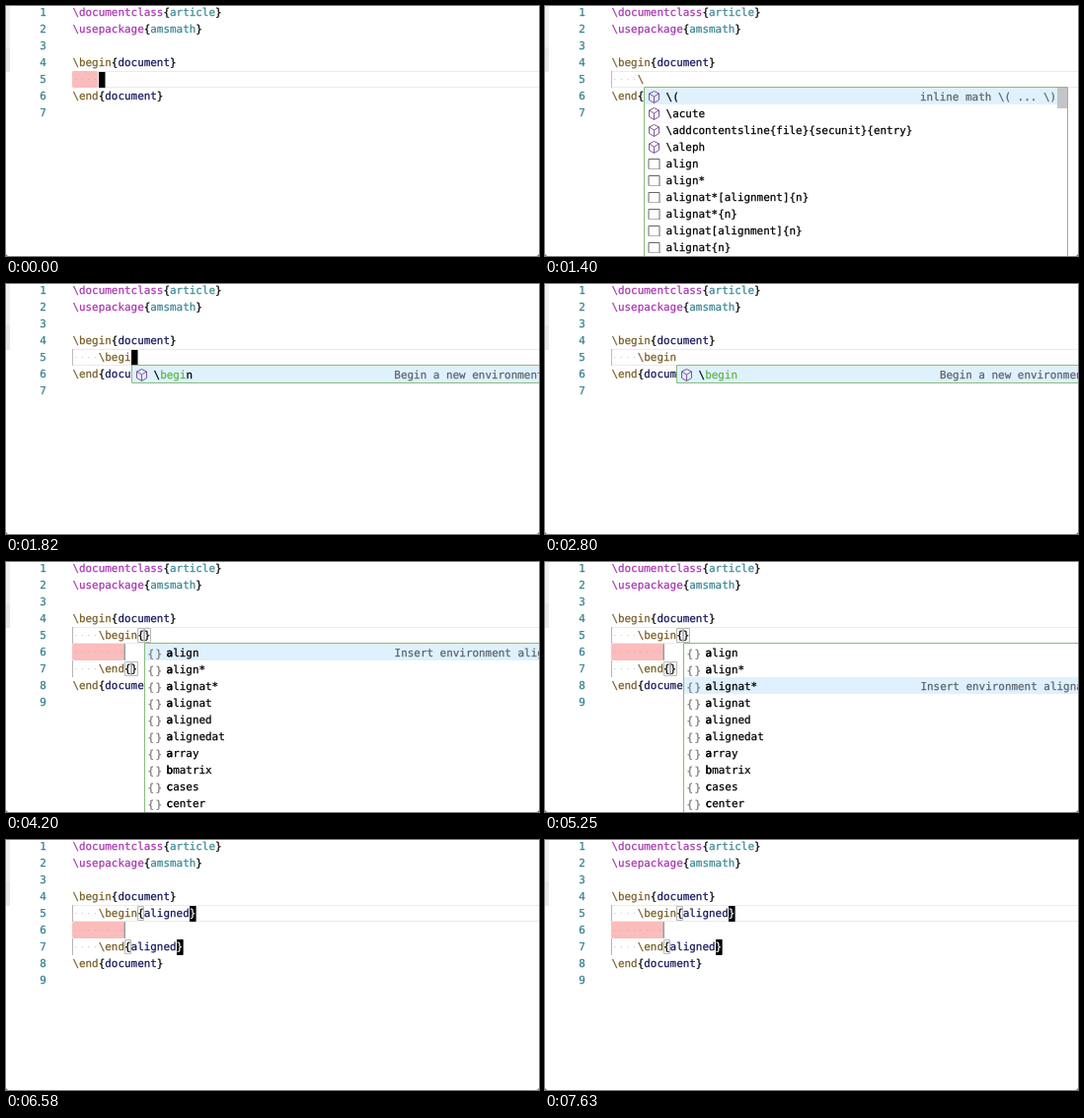
An HTML page with a canvas that plays this animation: 540x254 px, repeating every 7910 ms.

```html
<!DOCTYPE html>
<html lang="en">
<head>
<meta charset="utf-8">
<title>Editor completion</title>
<style>
html, body { margin: 0; height: 100%; overflow: hidden; background: #777; }
canvas { display: block; background: #fff; border-radius: 0 0 4px 4px; }
</style>
</head>
<body>
<canvas id="stage" width="540" height="254"></canvas>
<script>
const ctx = document.getElementById('stage').getContext('2d');
const LOOP = 7910, CHAR = 6.573, EDGE = 67, LEFT = 67.4, ROW = 17, POPUP_TOP = 83;
const colX = col => LEFT + col * CHAR;
const rowY = line => line * ROW - 19;

// [start, typed text]
const typing = [[0, ''], [490, '\\'], [1470, '\\b'], [1680, '\\be'], [1750, '\\beg'], [1820, '\\begi'], [2100, '\\begin']];
const INSERT = 3500, ACCEPT = 6300;
// [start, selected row]
const selection = [[0, 0], [4970, 1], [5250, 2], [5390, 3], [5530, 4]];
// [start, cursor opacity, fade duration]
const blink = [[0, 1, 0], [70, 0, 210], [490, 1, 0], [910, 0, 210], [1470, 1, 0], [2660, 0, 210], [3150, 1, 210],
  [3500, 1, 0], [3850, 0, 210], [4410, 1, 140], [4900, 0, 210], [5390, 1, 210], [5950, 0, 210],
  [6300, 1, 0], [6860, 0, 210], [7350, 1, 210]];

const environments = ['align', 'align*', 'alignat*', 'alignat', 'aligned', 'alignedat', 'array', 'bmatrix', 'cases', 'center'];
const lists = {
  '\\': ['\\(', '\\acute', '\\addcontentsline{file}{secunit}{entry}', '\\aleph', 'align', 'align*',
    'alignat*[alignment]{n}', 'alignat*{n}', 'alignat[alignment]{n}', 'alignat{n}'],
  '\\b': ['\\backslash', '\\bar', '\\begin', '\\beta', '\\bf', '\\bibitem', '\\big', '\\bigcap', '\\bigcup', '\\binom'],
  '\\be': ['\\begin', '\\begingroup', '\\belowcaptionskip', '\\beta', '\\beth', '\\because', '\\between', '\\bezier']
};

const current = (steps, t) => steps.filter(s => s[0] <= t).pop();

function cursorAlpha(t) {
  const [start, goal, fade] = current(blink, t);
  if (!fade) return goal;
  const k = Math.min(1, (t - start + 70) / fade);
  return goal ? k : 1 - k;
}

function rect(x, y, w, h, color) {
  ctx.fillStyle = color;
  ctx.fillRect(x, y, w, h);
}

// A hairline outline gives the slightly heavy look of smoothed screen type.
function text(str, x, baseline, color) {
  ctx.fillStyle = ctx.strokeStyle = color;
  ctx.lineWidth = .25;
  [...str].forEach((c, i) => {
    ctx.fillText(c, x + i * CHAR, baseline);
    ctx.strokeText(c, x + i * CHAR, baseline);
  });
  ctx.lineWidth = 1;
}

function code(line, str) {
  let col = 0, argColor;
  for (const part of str.match(/ +|\\\w*|[{}]|[^ {}\\]+/g) || []) {
    let color = argColor;
    if (part[0] === '\\') {
      const preamble = /class|package/.test(part);
      color = preamble ? '#a835b2' : '#795e26';
      argColor = preamble ? '#3b8895' : '#14185c';
    } else if (/[{}]/.test(part)) color = '#000';
    if (part[0] !== ' ') text(part, colX(col), rowY(line) + 12, color);
    col += part.length;
  }
}

function dots(line, count, color) {
  for (let i = 0; i < count; i++) rect(colX(i) + 2.8, rowY(line) + 8, 1.2, 1.2, color);
}

function warn(line, count) {
  ctx.fillStyle = '#fbbcbc';
  ctx.beginPath();
  ctx.roundRect(EDGE, rowY(line), count * CHAR, ROW, 2);
  ctx.fill();
  dots(line, count, '#eda6a6');
}

function bracket(line, col) {
  ctx.strokeStyle = '#b9b9b9';
  ctx.strokeRect(Math.round(colX(col)) + .5, rowY(line) + 1.5, 6, 14);
}

function cursor(line, col, under, alpha) {
  ctx.globalAlpha = alpha;
  rect(Math.round(colX(col)), rowY(line) + 1, 6.5, 16, '#000');
  text(under, colX(col), rowY(line) + 12, '#fff');
  ctx.globalAlpha = 1;
}

function path(points, color) {
  ctx.strokeStyle = color;
  ctx.beginPath();
  points.forEach(([x, y], i) => i ? ctx.lineTo(x, y) : ctx.moveTo(x, y));
  ctx.stroke();
}

function icon(label, x, y, braces) {
  if (braces) {
    text('{', x - 7, y + 4, '#777');
    text('}', x + 1, y + 4, '#777');
  } else if (label[0] === '\\') {
    const p = [[0, -6], [5, -3.5], [5, 3], [0, 6], [-5, 3], [-5, -3.5]].map(([a, b]) => [x + a, y + b]);
    path([...p, p[0]], '#80549c');
    path([p[5], [x, y - .5], p[1]], '#80549c');
    path([[x, y - .5], p[3]], '#80549c');
  } else {
    path([[x - 5.5, y + 5], [x - 5.5, y - 5], [x + 5.5, y - 5], [x + 5.5, y + 5]], '#666');
    ctx.setLineDash([1, 1]);
    path([[x - 5, y + 5], [x + 6, y + 5]], '#666');
    ctx.setLineDash([]);
  }
}

function popup(col, items, selected, detail, detailX, prefix, braces) {
  const x = Math.round(colX(col)), height = items.length > 9 ? 206 : items.length * ROW;
  rect(x, POPUP_TOP, 430, height, '#fff');
  rect(x + 1, POPUP_TOP + selected * ROW, 428, ROW, '#dff1fd');
  items.forEach((label, i) => {
    const y = POPUP_TOP + i * ROW, baseline = y + 13, textX = x + 22.6;
    icon(label, x + 10.5, y + 9.5, braces);
    const matched = label.startsWith(prefix) ? prefix.length : 1;
    text(label[0], textX, baseline, '#000');
    text(label.slice(1, matched), textX + CHAR, baseline, '#5fb548');
    text(label.slice(matched), textX + matched * CHAR, baseline, '#000');
  });
  text(detail, detailX, POPUP_TOP + 13 + selected * ROW, '#5c646a');
  if (items.length > 9) rect(x + 419, POPUP_TOP, 10, 21, '#c3c5c7');
  ctx.strokeStyle = '#87bd78';
  ctx.strokeRect(x + .5, POPUP_TOP - .5, 429, height + 1);
}

function draw(t) {
  const typed = current(typing, t)[1];
  const inserted = t >= INSERT, accepted = t >= ACCEPT;
  const env = accepted ? 'aligned' : '';
  const alpha = cursorAlpha(t);
  const lines = ['\\documentclass{article}', '\\usepackage{amsmath}', '', '\\begin{document}'];
  if (inserted) lines.push(`    \\begin{${env}}`, '', `    \\end{${env}}`);
  else lines.push('    ' + typed);
  lines.push('\\end{document}', '');

  rect(0, 0, 540, 254, '#fff');
  rect(0, 0, 4, 67, '#f1f1f1');
  rect(0, 42, 4, 25, '#e8e8e8');
  rect(EDGE, 66, 473, 1, '#ebebeb');
  rect(EDGE, 82, 473, 1, '#ebebeb');

  if (inserted) {
    warn(6, 8);
    for (const [line, col] of [[5, 10], [7, 8]]) {
      dots(line, 4, '#ccc');
      bracket(line, col);
      bracket(line, col + env.length + 1);
    }
    rect(EDGE, 66, 1, 17, '#b5b5b5');
    rect(EDGE, 100, 1, 17, '#b5b5b5');
    rect(119.5, 83, 1.3, 17, '#84898e');
  } else if (typed) {
    dots(5, 4, '#ccc');
    rect(EDGE, 66, 1, 17, '#bbb');
  } else warn(5, 4);

  lines.forEach((str, i) => {
    text(String(i + 1), 34.2, rowY(i + 1) + 12, '#347f91');
    code(i + 1, str);
  });

  if (inserted) {
    cursor(5, 11 + env.length, '}', alpha);
    cursor(7, 9 + env.length, '}', alpha);
    if (!accepted) {
      const row = current(selection, t)[1], name = environments[row];
      popup(11, environments, row, 'Insert environment ' + name, 393.6 - Math.min(2, name.length - 5) * CHAR, '', true);
    }
  } else {
    const col = 4 + typed.length;
    cursor(5, col, '', alpha);
    if (t >= 560) {
      const math = typed === '\\';
      const items = lists[typed] || ['\\begin'];
      const begin = items[0] === '\\begin';
      popup(col, items, 0, math ? 'inline math \\( ... \\)' : begin ? 'Begin a new environment' : '',
        math ? 380 : colX(col) + 266.8, typed, false);
    }
  }
}

function tick(now) {
  ctx.font = '10.92px "DejaVu Sans Mono", monospace';
  ctx.textRendering = 'geometricPrecision';
  ctx.lineJoin = 'round';
  draw(now % LOOP);
  requestAnimationFrame(tick);
}
requestAnimationFrame(tick);
</script>
</body>
</html>
```
